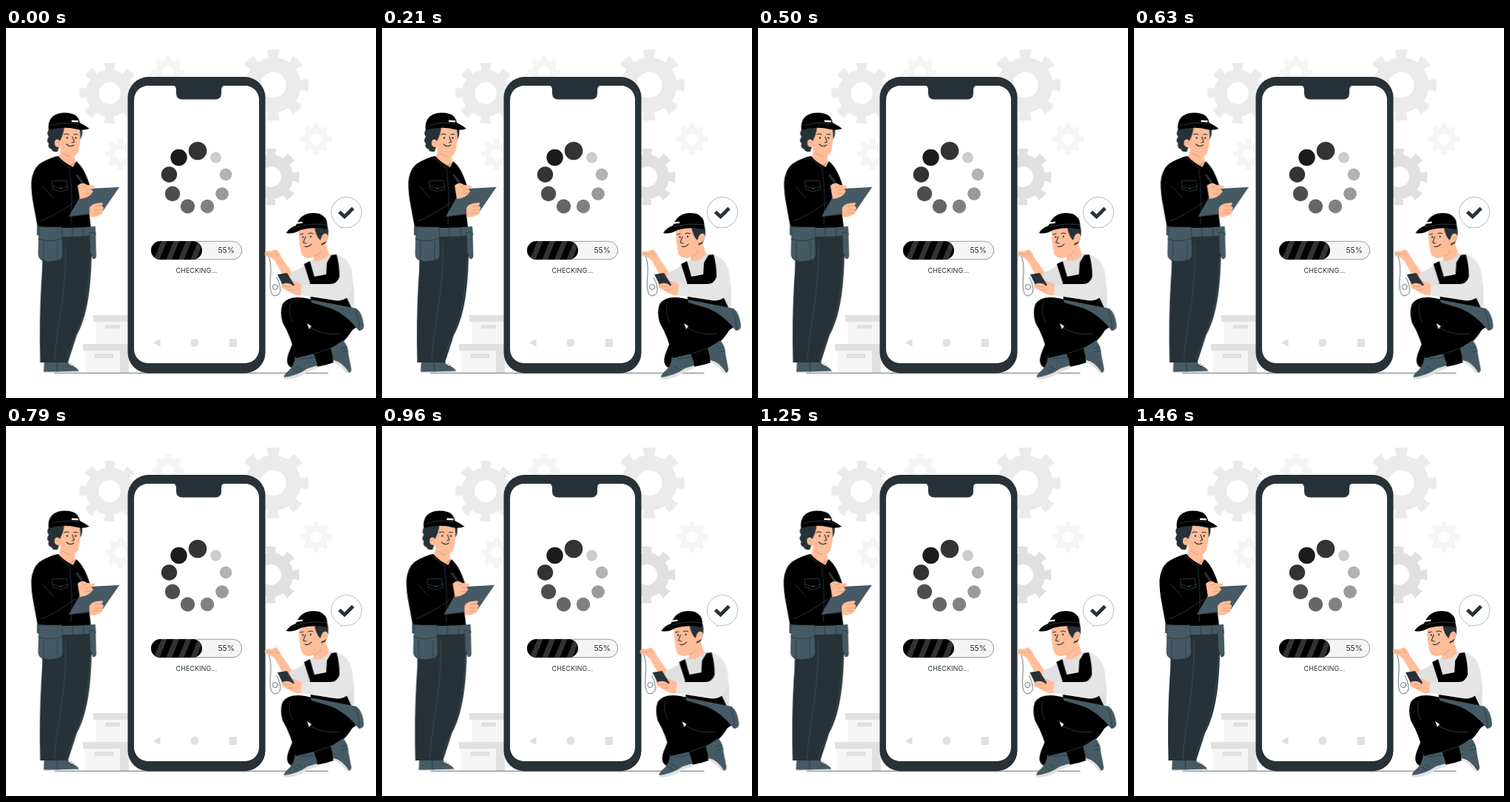
Write an HTML page without scripts that moves like this. It is 500 px wide and 500 px high and loops after 1.5 s.

```html
<!DOCTYPE html>
<html lang="en">
<head>
<meta charset="utf-8">
<title>Checking</title>
<style>
  html, body { margin: 0; width: 100%; height: 100%; overflow: hidden; background: #fff; }
  svg { display: block; width: 100%; height: 100%; }
  text { font-family: Inter, sans-serif; fill: #263238; }
  .dark { fill: #263238; }
  .slate { fill: #455a64; }
  .skin { fill: #ffbd99; }
  .light { fill: #e0e0e0; }
  .pale { fill: #f5f5f5; }
  .white { fill: #fff; }
  .line { fill: none; stroke: #263238; stroke-width: .7; stroke-linecap: round; stroke-linejoin: round; }
  .face { stroke-width: 1.1; }
  .seam { fill: none; stroke: #455a64; stroke-width: .6; stroke-linecap: round; }
  .fold { fill: none; stroke: #d98d6c; stroke-width: .7; stroke-linecap: round; }
  .shake { animation: shake 1.5s ease infinite; }
  @keyframes shake {
    10%, 90% { transform: translateX(-1px); }
    20%, 80% { transform: translateX(2px); }
    30%, 50%, 70% { transform: translateX(-4px); }
    40%, 60% { transform: translateX(4px); }
  }
</style>
</head>
<body>
<svg viewBox="0 0 500 500">
  <defs>
    <g id="gear" fill="none">
      <circle r="28.5" stroke-width="21"/>
      <circle r="43" stroke-width="14" pathLength="8" stroke-dasharray=".46 .54" transform="rotate(-100)"/>
    </g>
    <clipPath id="fill"><rect x="196" y="288" width="69" height="25" rx="12.5"/></clipPath>
  </defs>

  <!-- gears -->
  <g stroke="#f5f5f5">
    <use href="#gear" transform="translate(219 60) scale(.44)"/>
    <use href="#gear" transform="translate(155 171) scale(.42)"/>
    <use href="#gear" transform="translate(419 150) scale(.42)"/>
  </g>
  <g stroke="#ebebeb">
    <use href="#gear" transform="translate(140 88) scale(.82)"/>
    <use href="#gear" transform="translate(361 77) scale(.96)"/>
  </g>
  <use href="#gear" stroke="#e0e0e0" transform="translate(358 201) scale(.77)"/>

  <!-- boxes -->
  <path class="pale" d="M122 397h44v30h-44zM107 436h59v30h-59z"/>
  <path class="light" d="M118 388h48v9h-48zM104 427h62v9h-62zM154 436h12v30h-12zM134 401h20v5h-20zM120 440h25v6h-25z"/>

  <path class="line" d="M66 466.300H435"/>

  <!-- phone -->
  <rect class="dark" x="164.500" y="66" width="186" height="400.500" rx="28"/>
  <rect class="white" x="173" y="78" width="169" height="375" rx="19"/>
  <path class="dark" d="M225 77.500Q230 78 230 84v4q0 8.500 8 8.500h45q8 0 8-8.500v-4q0-6 5-6.500z"/>

  <g>
    <circle cx="259" cy="166" r="12.300" fill="#333"/>
    <circle cx="283.500" cy="175" r="7.500" fill="#ccc"/>
    <circle cx="297" cy="198" r="8.300" fill="#b3b3b3"/>
    <circle cx="292" cy="224" r="8.800" fill="#999"/>
    <circle cx="272" cy="241" r="9.200" fill="#808080"/>
    <circle cx="245.500" cy="241" r="9.700" fill="#666"/>
    <circle cx="225" cy="224" r="10.200" fill="#4d4d4d"/>
    <circle cx="220.500" cy="198" r="10.700" fill="#333"/>
    <circle cx="233.500" cy="175" r="11.200" fill="#1a1a1a"/>
  </g>

  <rect x="196.300" y="288.300" width="122.400" height="24.400" rx="12.200" fill="#f5f5f5" stroke="#263238" stroke-width=".5"/>
  <g clip-path="url(#fill)">
    <path d="M196 288h69v25h-69z"/>
    <path d="M205 0H262" stroke="#333" stroke-width="26" stroke-dasharray="7.500 9" transform="translate(0 300.500) skewX(-22)"/>
  </g>
  <text x="309" y="304.300" font-size="10.400" text-anchor="end">55%</text>
  <text x="229.500" y="331.200" font-size="9.100">CHECKING...</text>

  <g class="light">
    <path d="M199 425.500l9.500-5.500v11z"/>
    <circle cx="255" cy="425.300" r="5.600"/>
    <path d="M301.500 420h10.500v11h-10.500z"/>
  </g>

  <!-- speech bubble -->
  <path class="white" stroke="#263238" stroke-width=".35" d="M450 267A20.500 20.500 0 1 1 455 269L453.500 271Q453 269 450 267z"/>
  <path d="M450.500 248.500l7 6.500 11.500-11.500" fill="none" stroke="#263238" stroke-width="4.800"/>

  <!-- standing worker -->
  <g class="shake">
    <path class="slate" d="M52 449H71L82 463V466H51z"/>
    <path class="slate" d="M67 448H83L86 455Q96 458 98.500 463V465H69z"/>
    <path class="light" d="M51 464.500H69L98.500 463.500V466H51z"/>
    <path class="line" d="M69 452L70 464M85 456l4-2M88 458l4-2"/>
    <path class="dark" d="M48 276H116C117 335 113 385 96 415L84 452H46.500Q45 395 48 345Q51 310 48 276z"/>
    <path class="seam" d="M81 290Q82 335 74 385T66 450M114 310Q112 375 96 412L82 446"/>

    <path class="skin" d="M75 160L92 168L95 187L82 192L71 178z"/>
    <path d="M66 174Q54 178 45 184Q36 192 34.500 208Q34 222 38 242L43 269Q80 273 115 269L113 252L114 214Q106 188 95 180L91 188Q77 181 71 173z"/>
    <path class="seam" d="M70 176L85 189L92 182M86 190Q91 225 88 265M63 207l19-1 2 12-10 3-10-3zM64 214Q74 219 84 214M50 214L64 230M47 261Q70 252 94 234"/>
    <circle class="white" cx="74" cy="217" r=".6"/>

    <path class="slate" d="M42 268Q82 272 121 268L122 280Q82 284 42 280z"/>
    <path class="slate" stroke="#263238" stroke-width=".6" d="M113 276l8 1 1 31q0 4-4 4l-4-9zM45 269H76L77 306Q77 313 68 314.500Q58 317 49 314Q44 311 44 306z"/>
    <path class="line" d="M44 285Q60 291 77 284M51 289V314M70 289V314M90 270V282M105 270V281"/>

    <path class="slate" d="M85 255L106 217.500L153 215L130 248.500L113 252z"/>
    <path class="line" d="M85 255L130 248.500L153 215"/>
    <path d="M96 199l11 15" stroke="#263238" stroke-width="3" stroke-linecap="round"/>
    <path class="skin" d="M97 213Q103 207 110 212L120 213Q121 215 116 218L118 221Q113 230 100 231z"/>
    <path class="fold" d="M104 216l6-3M109 219l7-1M107 224l9-1"/>
    <path class="skin" d="M113 243Q116 238 122 237L130 236Q133 238 129 240Q134 242 131 246Q133 250 127 253Q120 257 113 255z"/>
    <path class="fold" d="M121 241l8-1M121 246h10M120 250h8"/>

    <path class="dark" d="M59 136Q54 142 58 147Q54 152 58 156Q56 162 62 164Q63 168 70 167L76 148V134H59z"/>
    <path class="dark" d="M94 134l9 1q2 9-3 17z"/>
    <path class="skin" d="M71 136Q86 130 100 137Q102 150 99 163Q97 174 89 174Q77 173 73 161Q65 162 66 154Q67 149 72 151z"/>
    <path class="dark" d="M68 134H79Q78 144 73 153L70 149z"/>
    <path d="M58 138Q56 126 64 119Q75 112 90 116Q98 118 100 128Q108 132 113 136Q105 139 97 137Q78 132 58 138z"/>
    <path class="white" d="M89 124.500l9 .500v2.500l-9-.500z"/>
    <path class="seam" d="M61 132Q80 126 99 130"/>
    <ellipse class="dark" cx="83" cy="148.500" rx="1" ry="1.500"/>
    <ellipse class="dark" cx="94.500" cy="148.500" rx="1" ry="1.500"/>
    <path class="line face" d="M79 144q3-2 6 0M92 144q3-1 5 0M82 157q5 5 10 1M90 147l2.500 7-3 1"/>
    <path class="fold" d="M68 155q3-2 4 2M77 169q5 4 10 5"/>
  </g>

  <!-- crouching worker -->
  <g class="shake">
    <path class="line" d="M353 305Q359 312 358 332Q355 360 363 362Q372 361 371 352Q370 344 366 337"/>
    <circle class="line" cx="364" cy="350" r="3.500"/>

    <path d="M398 400H473Q465 415 456 424L441 432L443 452Q420 461 386 459Q377 455 382 440z"/>
    <path class="slate" d="M439 433L456 422Q463 430 463 440L467 461Q467 466 463 466Q453 452 443 449z"/>
    <path class="light" d="M443 449Q455 451 464 466L461 467Q452 455 442 451z"/>
    <path class="line" d="M453 433l7-2M455 438l7-2"/>
    <path class="slate" d="M391 443L416 439L421 454Q420 459 409 462Q394 472 377 474Q374 470 380 465Q390 457 391 443z"/>
    <path class="light" d="M376 472Q394 470 408 460L421 456V460L409 464Q394 475 377 475z"/>
    <path class="line" d="M393 457l7 4M389 461l7 4M398 447l19-2"/>

    <path d="M374 373Q382 361 405 365L468 379Q484 390 473 405Q445 426 420 416L407 402L417 440L392 446Q386 418 374 398Q370 384 374 373z"/>
    <path class="white" d="M407 399l6 4-3 4z"/>
    <path class="seam" d="M411 405Q432 417 452 413M418 440L441 432M385 372Q380 382 388 398"/>

    <path class="light" d="M409 316L431 306L443 305Q463 311 466 326Q473 352 470 380L416 368L408 347L388 347L382 331Q397 328 409 316z"/>
    <path d="M403 319L411 315L417 336L433 333L434 317L440 307L447 306L454 325V350L468 380L412 368L411 344z"/>
    <path class="slate" d="M412 367L474 379Q482 385 484 402Q484 409 477 409Q461 388 440 379L413 371z"/>
    <path class="line" d="M472 381q6 12 6 27"/>

    <path class="skin" d="M350 304Q352 300 358 302L365 299Q371 304 372 309L386 329L382 340L374 333L364 315Q359 309 351 308z"/>
    <path class="fold" d="M353 305l8 1M363 302l4 5"/>
    <path fill="#e6e6e6" d="M447 306Q464 311 468 330Q472 352 463 363Q455 370 444 368L399 361L400 346H438Q448 346 451 336Q451 320 447 306z"/>
    <path class="skin" d="M372 344Q381 340 390 342L400 346L399 361Q391 362 384 357L373 351z"/>
    <path class="dark" d="M367 333L380 331L390 347Q388 350 384 350L374 347z"/>
    <path class="skin" d="M374 346q7-3 13 1l3 5-14-1z"/>
    <path class="fold" d="M376 349l9 1M381 354h8"/>

    <path class="skin" d="M414 300L431 288L437 306Q429 316 417 315z"/>
    <path class="dark" d="M416 268H435Q438 280 432 291L422 296z"/>
    <path class="skin" d="M396 273Q410 267 423 271L426 282Q432 274 435 280Q436 289 427 291Q425 304 414 310Q405 313 400 306Q396 293 396 273z"/>
    <path class="dark" d="M417 269L429 270L428 279L425 287Q419 281 417 269z"/>
    <path d="M434 272Q437 256 424 251Q406 247 397 258Q393 263 392 267Q383 270 379 277Q388 279 398 273Q415 268 434 272z"/>
    <path class="white" d="M393 262.500l8-1v2.200l-8.500 1z"/>
    <path class="seam" d="M393 269Q412 263 434 266"/>
    <ellipse class="dark" cx="401.500" cy="282.500" rx=".9" ry="1.400"/>
    <ellipse class="dark" cx="412" cy="282" rx=".9" ry="1.400"/>
    <path class="line face" d="M398 279l4-1M409 278q3-2 6 0M404 295q5 2 9-3M405 282l-3 8 4 1"/>
    <path class="fold" d="M430 284q2-3 3-1M417 309q6-2 9-7"/>
  </g>
</svg>
</body>
</html>
```
